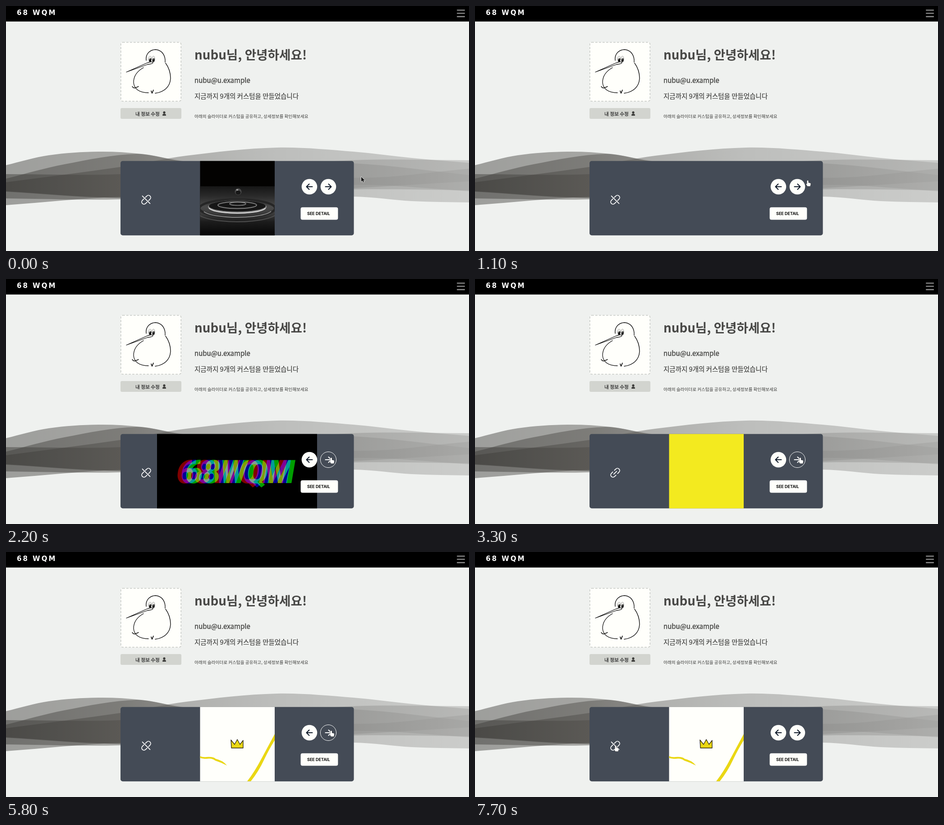
Write an HTML page with a canvas that moves like this. It is 1027 by 545 pixels and loops after 8 s.

```html
<!DOCTYPE html>
<html lang="ko">
<head>
<meta charset="utf-8">
<title>Profile slider</title>
<style>
html, body { margin: 0; width: 100%; height: 100%; overflow: hidden; background: #eff1ef; }
canvas { display: block; }
</style>
</head>
<body>
<canvas id="stage" width="1027" height="545"></canvas>
<script>
const ctx = document.getElementById('stage').getContext('2d');
const LOOP = 8000, STEP = 100;
const WHITE = '#fffffb', SLATE = '#444b56', INK = '#474745';
const KR = '"Noto Sans CJK KR", "Noto Sans CJK", "Noto Sans", sans-serif';

function rect(x, y, w, h, color, r = 0) {
  ctx.fillStyle = color;
  ctx.beginPath();
  ctx.roundRect(x, y, w, h, r);
  ctx.fill();
}

// weight adds a hairline outline for a medium cut
function text(str, x, y, font, color, { spacing = 0, weight = 0 } = {}) {
  ctx.font = font;
  ctx.fillStyle = ctx.strokeStyle = color;
  ctx.letterSpacing = spacing + 'px';
  ctx.fillText(str, x, y);
  if (weight) {
    ctx.lineWidth = weight;
    ctx.strokeText(str, x, y);
  }
  ctx.letterSpacing = '0px';
}

function stroke(d, color, width) {
  ctx.strokeStyle = color;
  ctx.lineWidth = width;
  ctx.lineCap = ctx.lineJoin = 'round';
  ctx.stroke(new Path2D(d));
}

function fill(d, color) {
  ctx.fillStyle = color;
  ctx.fill(new Path2D(d));
}

function ellipse(x, y, rx, ry, color, width = 0, from = 0, to = Math.PI * 2) {
  ctx.beginPath();
  ctx.ellipse(x, y, rx, ry, 0, from, to);
  ctx.lineWidth = width;
  ctx.fillStyle = ctx.strokeStyle = color;
  if (width) ctx.stroke(); else ctx.fill();
}

function gradient(x0, y0, x1, y1, stops) {
  const g = ctx.createLinearGradient(x0, y0, x1, y1);
  stops.forEach(([at, color]) => g.addColorStop(at, color));
  return g;
}

// Smooth curve through [x, y] points
function curve(pts) {
  const slope = k => {
    const p = pts[k - 1] || pts[k], n = pts[k + 1] || pts[k];
    return (n[1] - p[1]) / (n[0] - p[0]);
  };
  for (let i = 0; i < pts.length - 1; i++) {
    const [a, b] = [pts[i], pts[i + 1]];
    const third = (b[0] - a[0]) / 3;
    ctx.bezierCurveTo(a[0] + third, a[1] + slope(i) * third,
      b[0] - third, b[1] - slope(i + 1) * third, b[0], b[1]);
  }
}

const BANDS = [
  { top: [[0, 354], [95, 332], [205, 324], [300, 329], [400, 346], [771, 382], [1027, 362]],
    low: [[0, 428], [254, 430], [771, 405], [1027, 390]] },
  { top: [[0, 384], [130, 352], [290, 329], [400, 346], [771, 350], [1027, 376]],
    low: [[0, 443], [254, 424], [771, 408], [1027, 410]] },
  { top: [[0, 392], [254, 358], [400, 333], [600, 315], [771, 324], [900, 338], [1027, 349]],
    low: [[0, 412], [254, 427], [771, 424], [900, 434], [1027, 437]] },
  { top: [[0, 374], [254, 374], [771, 343], [1027, 343]],
    low: [[0, 413], [254, 426], [771, 398], [1027, 412]] }
];

function waves() {
  ctx.fillStyle = gradient(0, 0, 1027, 0, [
    [0, 'rgba(58,57,54,.45)'], [.25, 'rgba(76,74,70,.45)'],
    [.58, 'rgba(127,127,125,.45)'], [1, 'rgba(160,160,158,.45)']]);
  for (const { top, low } of BANDS) {
    const back = [...low].reverse();
    ctx.beginPath();
    ctx.moveTo(...top[0]);
    curve(top);
    ctx.lineTo(...back[0]);
    curve(back);
    ctx.fill();
  }
}

function bird() {
  rect(254, 80, 135, 132.5, WHITE, 5);
  ctx.setLineDash([5, 3]);
  ctx.strokeStyle = '#c6c9c5';
  ctx.lineWidth = 1.5;
  ctx.lineCap = 'butt';
  ctx.beginPath();
  ctx.roundRect(254.75, 80.75, 133.5, 131, 4);
  ctx.stroke();
  ctx.setLineDash([]);

  stroke('M311 121C309 105 321 97 332 97C346 98 354 110 353 125', '#111', 1.4);
  stroke('M354 127C362 138 365 150 365 161C364 181 349 192 331 194', '#111', 1.4);
  stroke('M305 137C289 146 283 158 283 170C284 184 295 193 316 193', '#111', 1.3);
  stroke('M267 147L312 127Q325 122 326 126Q325 129 314 130Z', '#111', 1.3);
  for (const x of [319.5, 327]) {
    ellipse(x, 118, 3.2, 6.5, WHITE);
    ellipse(x, 118, 3.2, 6.5, '#555', .6);
    ellipse(x + .2, 120, 2.3, 4.2, '#000');
    ellipse(x - .4, 117.5, .9, 1.2, WHITE);
  }
  stroke('M280 179Q284 184 287 182L294 179', '#111', 1.4);
  stroke('M322 189L324 194L327 187', '#111', 1.8);
}

function page() {
  rect(0, 0, 1027, 545, '#eff1ef');
  rect(0, 0, 1027, 34.5, '#000');
  text('68 WQM', 24, 20, '700 15px "DejaVu Sans", sans-serif', '#fff', { spacing: 3 });
  for (const y of [8, 15, 22.3]) rect(1000, y, 18, 2.6, '#858585', 1);

  bird();
  rect(254, 227, 135, 24, '#d2d4cf', 3);
  text('내 정보 수정', 287, 243.5, `500 10.7px ${KR}`, '#333', { weight: .3 });
  ellipse(351, 237, 2.6, 2.8, '#3c3c3a');
  rect(347, 240, 8, 4, '#3c3c3a', [3, 3, 1, 1]);

  text('nubu님, 안녕하세요!', 418, 119, `700 27.7px ${KR}`, INK);
  text('nubu@u.example', 418, 170.5, `500 15px ${KR}`, INK, { weight: .4 });
  text('지금까지 9개의 커스텀을 만들었습니다', 418, 205.5, `400 14.5px ${KR}`, '#3c3c3a', { weight: .2 });
  text('아래의 슬라이더로 커스텀을 공유하고, 상세정보를 확인해보세요', 418, 248.5,
    `400 9.65px ${KR}`, '#3c3c3a');
  waves();
  rect(254, 344.7, 517.6, 165.5, SLATE, 5);
}

function square(color) {
  rect(430.5, 344.7, 165.5, 165.5, color);
}

function water() {
  square('#030201');
  ctx.save();
  ctx.beginPath();
  ctx.rect(430.5, 401, 165.5, 109);
  ctx.clip();
  rect(430, 401, 166, 109, gradient(0, 401, 0, 510, [
    [0, '#161616'], [.2, '#2a2a2a'], [.42, '#4a4a4a'], [.58, '#383838'], [.72, '#1c1c1c'], [1, '#060606']]));
  ellipse(513, 450, 84, 20, '#262626', 5);
  ellipse(513, 447, 65, 15, '#8c8c8c');
  ellipse(513, 445, 63, 12.5, '#161616');
  ellipse(513, 447, 64, 14, '#dcdcdc', 2, .25, 2.9);
  ellipse(513, 443, 43, 7.5, '#808080', 2);
  ellipse(514, 440, 18, 3.5, '#8a8a8a', 1.5);
  ellipse(513, 452, 78, 18, '#8a8a8a', 2, .3, 2.8);
  ellipse(513, 456, 92, 24, '#4e4e4e', 2, .4, 2.7);
  ctx.restore();
  ellipse(515, 413, 7.5, 7.5, '#484848');
  ellipse(515, 415, 5.5, 4.5, '#171717');
  ellipse(513, 409, 2.5, 1.5, '#aaa');
}

function poster() {
  rect(335, 344.7, 355, 165.5, '#000');
  ctx.save();
  ctx.globalCompositeOperation = 'lighter';
  [['#800000', 0], ['#000096', 9], ['#009e00', 19]].forEach(([color, dx]) =>
    text('68WQM', 378 + dx, 453.5, 'italic 900 71px Roboto, sans-serif', color, { spacing: -1 }));
  ctx.restore();
}

function yellow() {
  square('#f3ea1f');
}

function crown() {
  square(WHITE);
  fill('M535 510Q552 488 567 459Q582 431 596 405V419Q585 436 573 461Q560 489 543 510Z', '#ead714');
  fill('M430.5 454Q436 457 445 456Q460 455 465 460Q482 464 490 475Q477 468 464 464Q457 458 445 460Q436 460 430.5 458Z', '#ead714');
  const d = 'M500 436L499 418L507 428L513 417L519 428L526 419L526 436Z';
  fill(d, '#ead714');
  stroke(d, '#2b2510', 1.3);
}

function linkIcon(linked) {
  ctx.save();
  ctx.translate(311, 431);
  ctx.rotate(-Math.PI / 4);
  stroke('M-2.5 -5H-7A5 5 0 0 0 -7 5H-2.5M2.5 -5H7A5 5 0 0 1 7 5H2.5', '#fff', 1.8);
  stroke(linked ? 'M-4.5 0H4.5' : 'M0 -12V12', '#fff', 1.8);
  ctx.restore();
}

function arrowButton(x, dir, hover) {
  if (hover) {
    ellipse(x, 402, 18, 18, SLATE);
    ellipse(x, 402, 17.6, 17.6, '#fff', 1);
  } else {
    ellipse(x, 402, 17.3, 17.3, WHITE);
  }
  ctx.save();
  ctx.translate(x, 402);
  ctx.scale(dir, 1);
  stroke('M-6.5 0H6.5M.5 -6L6.5 0L.5 6', hover ? '#fff' : '#0b1626', 2.1);
  ctx.restore();
}

function cursor(x, y, hand) {
  ctx.save();
  ctx.translate(x, y);
  if (hand) {
    const d = 'M-1.5 1Q0 -1 1.5 1V5L6 6Q7 7 6.5 9L5.5 13H-.5L-3.5 8.5Q-3 7 -1.5 8Z';
    stroke(d, '#222', 1);
    fill(d, '#fff');
  } else {
    const d = 'M0 0V11L2.6 8.6L4.4 12.6L6.2 11.8L4.5 8H8Z';
    stroke(d, '#fff', 1.2);
    fill(d, '#1a1a1a');
  }
  ctx.restore();
}

const SLIDES = [[0, water], [1100, null], [2200, poster], [3300, yellow], [4500, poster], [5800, crown]];

// time, x, y
const PATH = [
  [0, 788, 380], [500, 788, 380], [1100, 738, 388], [1400, 721.5, 397.5],
  [6000, 721.5, 397.5], [6900, 311.5, 424.5], [7200, 312, 430.5], [LOOP, 312, 430.5]
];

function pointer(t) {
  const i = PATH.findIndex(p => p[0] > t) - 1;
  const [a, b] = [PATH[i], PATH[i + 1]];
  let k = (t - a[0]) / (b[0] - a[0]);
  if (a[0] === 6000) k = k * k * (3 - 2 * k);
  return [a[1] + (b[1] - a[1]) * k, a[2] + (b[2] - a[2]) * k];
}

function draw(time) {
  const t = Math.floor(time / STEP) * STEP;
  const slide = SLIDES.filter(s => s[0] <= t).pop()[1];
  const [x, y] = pointer(t);
  page();
  if (slide) slide();
  linkIcon(slide === yellow || (t >= 7200 && t < 7700));
  arrowButton(673, -1, false);
  arrowButton(715, 1, t >= 1500 && t < 6200);
  rect(653.6, 447.8, 82.8, 27.8, WHITE, 4);
  text('SEE DETAIL', 668, 465, '700 9px Inter, sans-serif', '#0a0a0a');
  cursor(x, y, (x > 697 && x < 746) || x < 322);
}

let start;
function tick(now) {
  start ??= now;
  draw((now - start) % LOOP);
  requestAnimationFrame(tick);
}
requestAnimationFrame(tick);
</script>
</body>
</html>
```
